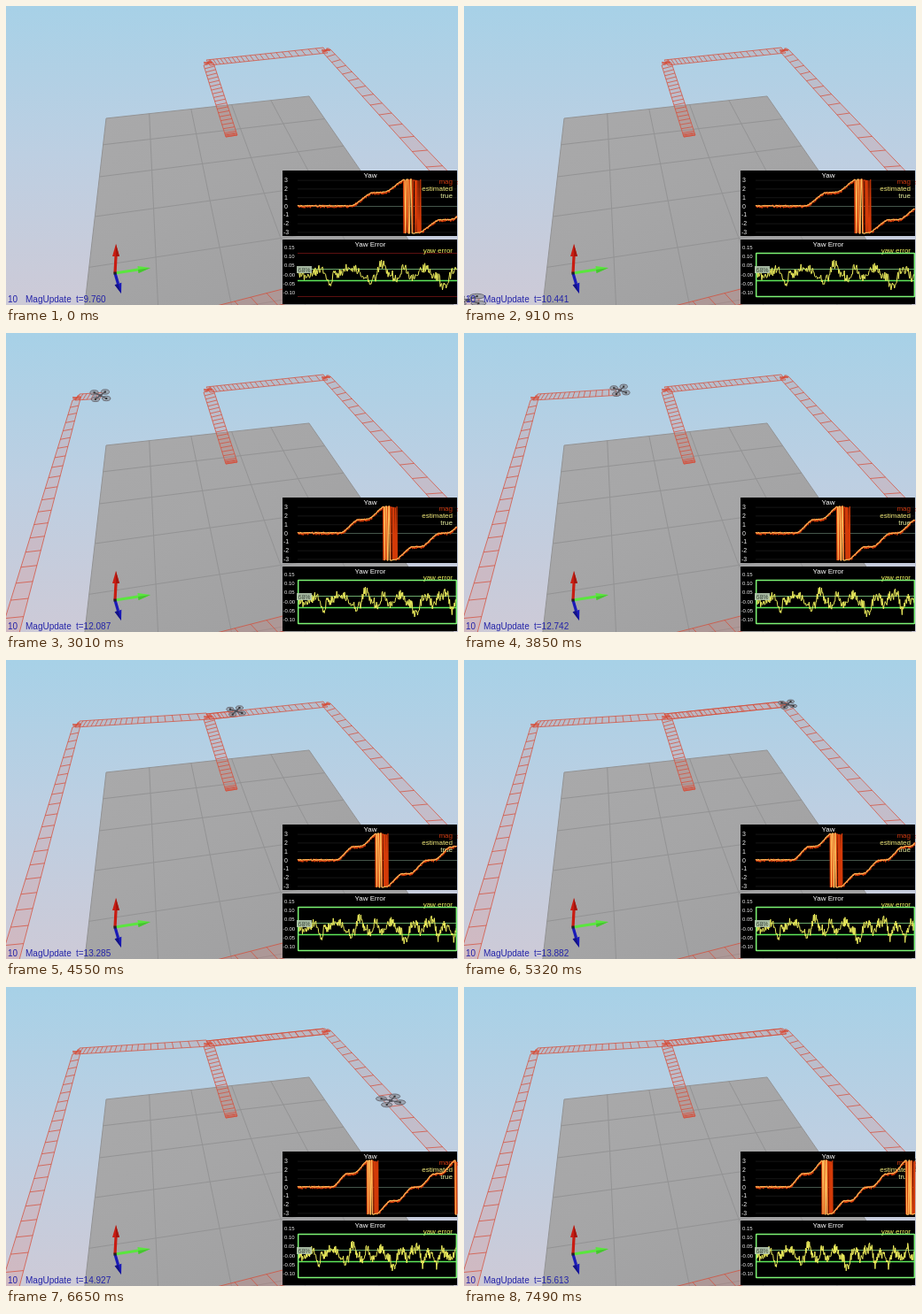
Write an HTML page with a canvas that moves like this. It is 510 px wide and 338 px high and loops after 7.56 s.

```html
<!DOCTYPE html>
<html>
<head>
<meta charset="utf-8">
<style>
html, body { margin: 0; width: 100%; height: 100%; overflow: hidden; background: #bfd0e2; }
canvas { display: block; }
</style>
</head>
<body>
<canvas id="stage" width="510" height="338"></canvas>
<script>
const g = document.getElementById('stage').getContext('2d');
const LOOP = 7560, STEP = 70;
const FONT = '"Liberation Sans", Arial, sans-serif';
const clockKeys = [[0, 9.76], [910, 10.441], [2170, 11.431], [3850, 12.742],
  [5320, 13.882], [6650, 14.927], [7490, 15.613]];
const errorKeys = [[0, 0], [.6, -.02], [1.35, .035], [2, -.035], [2.65, .02], [3.3, .045],
  [4.4, -.05], [5.23, .06], [5.9, -.03], [6.5, .04], [7.1, -.03], [7.6, .04], [8.3, 0],
  [9.05, -.07], [9.6, .04], [10.3, -.02], [11.15, .06], [11.7, -.035], [12.3, .03],
  [13, -.045], [13.6, .04], [14.2, -.03], [14.9, .035], [15.6, -.02]];

const clamp = v => Math.max(0, Math.min(1, v));
const mix = (a, b, u) => a + (b - a) * u;
const mixPt = (a, b, u) => [mix(a[0], b[0], u), mix(a[1], b[1], u)];
const noise = n => { const v = Math.sin(n * 127.1 + 11.7) * 43758.5453; return (v - Math.floor(v)) * 2 - 1; };
const perspective = (s, k) => s * k / (1 - s + s * k);

function sample(keys, t) {
  let i = 1;
  while (i < keys.length - 1 && keys[i][0] < t) i++;
  const [a, b] = [keys[i - 1], keys[i]];
  return mix(a[1], b[1], (t - a[0]) / (b[0] - a[0]));
}
function line(pts, color, width = 1) {
  g.beginPath();
  pts.forEach(p => g.lineTo(...p));
  g.strokeStyle = color;
  g.lineWidth = width;
  g.stroke();
}
function fill(pts, color) {
  g.beginPath();
  pts.forEach(p => g.lineTo(...p));
  g.fillStyle = color;
  g.fill();
}
function text(str, x, y, size, color, align = 'left') {
  g.font = size + 'px ' + FONT;
  g.textAlign = align;
  g.fillStyle = color;
  g.fillText(str, x, y);
}

function drawSky() {
  const sky = g.createLinearGradient(0, 0, 0, 338);
  sky.addColorStop(0, '#a7d1e7');
  sky.addColorStop(.5, '#bdcfe2');
  sky.addColorStop(1, '#cdcad7');
  g.fillStyle = sky;
  g.fillRect(0, 0, 510, 338);
}

// All columns of the floor meet at one vanishing point.
const VX = 148, VY = -179;
function floorPoint(row, right) {
  const d = right ? 1 / (.003559 - .000297 * row) : 1 / (.003268 - .00029 * row);
  return [VX + d * (right ? 194 / 281 : -35 / 306), VY + d];
}
function drawFloor() {
  const shade = g.createLinearGradient(120, 110, 260, 338);
  shade.addColorStop(0, '#a9a9aa');
  shade.addColorStop(.5, '#a6a6a7');
  shade.addColorStop(1, '#a1a1a2');
  const [left, right] = [floorPoint(0, false), floorPoint(0, true)];
  fill([left, right, floorPoint(6, true), floorPoint(6, false)], shade);
  for (let row = 0; row < 6; row++)
    line([floorPoint(row, false), floorPoint(row, true)], '#939394');
  for (let col = 0; col <= 5; col++) {
    const [x, y] = mixPt(left, right, perspective(col / 5, 1.08));
    line([[x, y], [mix(VX, x, 2.6), mix(VY, y, 2.6)]], '#939394');
  }
}

// A leg has two edges [start, end], rung count n and spacing factor k.
const legs = {
  start: { a: [[248, 148], [223, 67]], b: [[261, 146], [234, 64]], n: 19, k: 1.1 },
  top: { a: [[226, 61], [358, 47]], b: [[230, 67], [363, 53]], n: 23, k: .65 },
  right: { a: [[357, 52], [492, 202]], b: [[366, 49], [512, 201]], n: 14, k: .5 },
  bottom: { a: [[312, 320], [222, 343]], b: [[325, 334], [235, 357]], n: 5, k: 1 },
  left: { a: [[-15, 368], [75, 76]], b: [[8, 366], [84, 74]], n: 21, k: 1.75 },
  back: { a: [[83, 69], [226, 60]], b: [[78, 76], [230, 67]], n: 22, k: .6 },
  again: { a: [[226, 61], [360, 47]], b: [[230, 67], [364, 53]], n: 9, k: .85 }
};
const RED = 'rgba(214,76,54,.72)';
function ribbon({ a, b, n, k }, upTo = 1, tint = .2) {
  if (upTo <= 0) return;
  const endA = mixPt(...a, upTo), endB = mixPt(...b, upTo);
  fill([a[0], endA, endB, b[0]], `rgba(220,115,105,${tint})`);
  line([a[0], endA], RED);
  line([b[0], endB], RED);
  for (let i = 0; i <= n; i++) {
    const u = perspective(i / n, k);
    if (u <= upTo) line([mixPt(...a, u), mixPt(...b, u)], RED);
  }
}
// Rungs fanned out where the vehicle turned on the spot.
function corner(x, y, r) {
  for (let i = 0; i < 6; i++) {
    const q = -.2 + i * .3, c = Math.cos(q) * r, s = Math.sin(q) * r * .6;
    line([[x - c, y + s], [x + c, y - s]], RED);
  }
}

const flight = [
  { from: 760, to: 2230, a: [-6, 368], b: [79, 74], ease: s => 1 - (1 - s) ** 1.2 },
  { from: 2230, to: 5250, a: [79, 73], b: [364, 49], ease: s => s ** 1.73 },
  { from: 5250, to: 7490, a: [364, 49], b: [500, 203], ease: s => s ** 1.41 }
];
const progress = (ms, f) => f.ease(clamp((ms - f.from) / (f.to - f.from)));

// Size, flatness and heading of the vehicle over time.
const sizeKeys = [[760, 17], [910, 16], [2170, 9.5], [3850, 8], [5320, 7.5], [6650, 11.5], [7490, 14]];
const flatKeys = [[760, .3], [910, .35], [1700, .75], [2170, .95], [2600, .6], [3850, .62], [5320, .5], [6650, .45], [7490, .45]];
const turnKeys = [[760, .7], [2170, .8], [3850, .55], [5320, .5], [6650, .4], [7490, .4]];
function drawDrone(ms) {
  if (ms < flight[0].from) return;
  const f = flight.find(f => ms <= f.to) || flight[2];
  const [x, y] = mixPt(f.a, f.b, progress(ms, f));
  const r = sample(sizeKeys, ms), flat = sample(flatKeys, ms), turn = sample(turnKeys, ms);
  const tips = [0, 1, 2, 3].map(i => {
    const q = turn + i * Math.PI / 2;
    return [x + Math.cos(q) * r, y + Math.sin(q) * r * flat];
  });
  tips.forEach(([px, py]) => {
    g.beginPath();
    g.ellipse(px, py, r * .53, r * .5 * flat, 0, 0, 7);
    g.fillStyle = 'rgba(140,143,152,.65)';
    g.fill();
    g.strokeStyle = '#6a6b74';
    g.lineWidth = 1;
    g.stroke();
  });
  line([tips[0], tips[2]], '#55565e', 1.3);
  line([tips[1], tips[3]], '#55565e', 1.3);
  tips.forEach(([px, py]) => { g.fillStyle = '#333'; g.fillRect(px - 1, py - 1, 2, 2); });
  g.fillStyle = '#505058';
  g.fillRect(x - 2, y - 1.5, 4, 3);
}

function drawTrail(ms) {
  const [u1, u2] = flight.map(f => progress(ms, f));
  ribbon(legs.bottom);
  ribbon(legs.start);
  for (let i = 0; i < 4; i++) line([[248 - i * .4, 148 - i], [261 - i * .4, 146 - i]], RED);
  ribbon(legs.top);
  ribbon(legs.right);
  corner(228, 64, 5);
  corner(361, 50, 5);
  ribbon(legs.left, u1);
  if (u2 > 0) corner(80, 73, 5);
  const x = 79 + 285 * u2;
  ribbon(legs.back, clamp((x - 79) / 149));
  ribbon(legs.again, clamp((x - 228) / 134), .1);
}

function arrow(tip, neck, color, dark, half) {
  const o = [123, 302], dx = tip[0] - neck[0], dy = tip[1] - neck[1], l = Math.hypot(dx, dy);
  const nx = -dy / l * half, ny = dx / l * half;
  line([o, neck], color, 3.2);
  fill([tip, [neck[0] + nx, neck[1] + ny], [neck[0] - nx, neck[1] - ny]], color);
  fill([tip, neck, [neck[0] + nx, neck[1] + ny]], dark);
}
function drawAxes() {
  arrow([163, 296], [149, 298], '#5ae63e', '#46c430', 4);
  arrow([124, 269], [124, 283], '#c81c12', '#a3160e', 4);
  arrow([130, 325], [126.5, 314], '#1a1ab8', '#121284', 4);
  g.fillStyle = '#222';
  g.fillRect(121.5, 300.5, 3, 3);
}

const X0 = 329, XW = 180;
function plot(end, dt, value, toY, color, width) {
  const pts = [];
  for (let i = 0; i * dt <= end; i++)
    pts.push([X0 + XW * i * dt / end, toY(value(i * dt, i))]);
  g.lineJoin = 'bevel';
  line(pts, color, width);
}
// Quarter turns, each followed by a slow drift.
function yaw(t) {
  const q = (t - 3.3) / 2.04;
  if (q < 0) return 0;
  const f = q - Math.floor(q), s = clamp(f / .62);
  const turn = mix(s, s * s * (3 - 2 * s), .6);
  return Math.PI / 2 * (Math.floor(q) + mix(turn, f, .12));
}
const wrap = a => a - 2 * Math.PI * Math.floor((a + Math.PI) / (2 * Math.PI));
const yawError = (t, i) => sample(errorKeys, t) + .012 * Math.sin(9 * t) + noise(i) * .028;

function panel(top, height, title) {
  g.fillStyle = '#000';
  g.fillRect(312, top, 197, height);
  text(title, 411, top + 8, 8, '#fff', 'center');
}
function drawYaw(now) {
  const toY = v => 226.5 - v * 9.8;
  panel(186, 74, 'Yaw');
  for (let v = -3; v <= 3; v++) {
    line([[X0, toY(v)], [509, toY(v)]], v ? '#161616' : '#45564a');
    text(v, v < 0 ? 313 : 314, toY(v) + 2, 7, '#eee');
  }
  text('mag', 504, 201, 8, '#cf3a10', 'right');
  text('estimated', 504, 209, 8, '#f0e878', 'right');
  text('true', 504, 217, 8, '#e8f0a0', 'right');
  plot(now, .025, (t, i) => wrap(yaw(t) + noise(i + 50) * .19), toY, '#d33a08', 1.1);
  plot(now, .05, (t, i) => wrap(yaw(t) + .07 + noise(i + 400) * .05), toY, '#ffbc5a', 1.1);
}

function drawError(now) {
  const toY = v => 303.5 - v * 205;
  const passed = now >= 10;
  panel(264, 73, 'Yaw Error');
  [.15, .1, .05, 0, -.05, -.1].forEach(v =>
    text((v <= 0 ? '-' : '') + Math.abs(v).toFixed(2), v <= 0 ? 312.5 : 314, toY(v) + 2, 6, '#eee'));
  line([[X0, 279.5], [509, 279.5]], '#5c1010');
  line([[X0, 328.5], [509, 328.5]], '#5c1010');
  text('yaw error', 504, 279, 8, '#f4f460', 'right');
  line([[X0, 297.5], [509, 297.5]], '#6aa86a');
  line([[X0, 310.5], [509, 310.5]], '#5ee85a', 1.3);
  plot(now, .045, yawError, toY, '#ecec5c', 1);
  if (passed) {
    g.strokeStyle = '#7cf474';
    g.lineWidth = 1.5;
    g.strokeRect(329.7, 279.5, 178.6, 49);
  }
  g.fillStyle = 'rgba(185,205,180,.88)';
  g.fillRect(328, 294, 17, 8);
  text('68%', 336.5, 300.5, 7, '#3c463c', 'center');
}

function draw(ms) {
  const now = sample(clockKeys, ms);
  drawSky();
  drawFloor();
  drawTrail(ms);
  drawAxes();
  drawDrone(ms);
  text('10', 2, 335, 10, '#2424a8');
  text('MagUpdate', 22, 335, 10, '#2424a8');
  text('t=' + now.toFixed(3), 79, 335, 10, '#2424a8');
  drawYaw(now);
  drawError(now);
}

const begin = performance.now();
function frame() {
  const ms = (performance.now() - begin) % LOOP;
  draw(Math.floor(ms / STEP) * STEP);
  requestAnimationFrame(frame);
}
frame();
</script>
</body>
</html>
```
